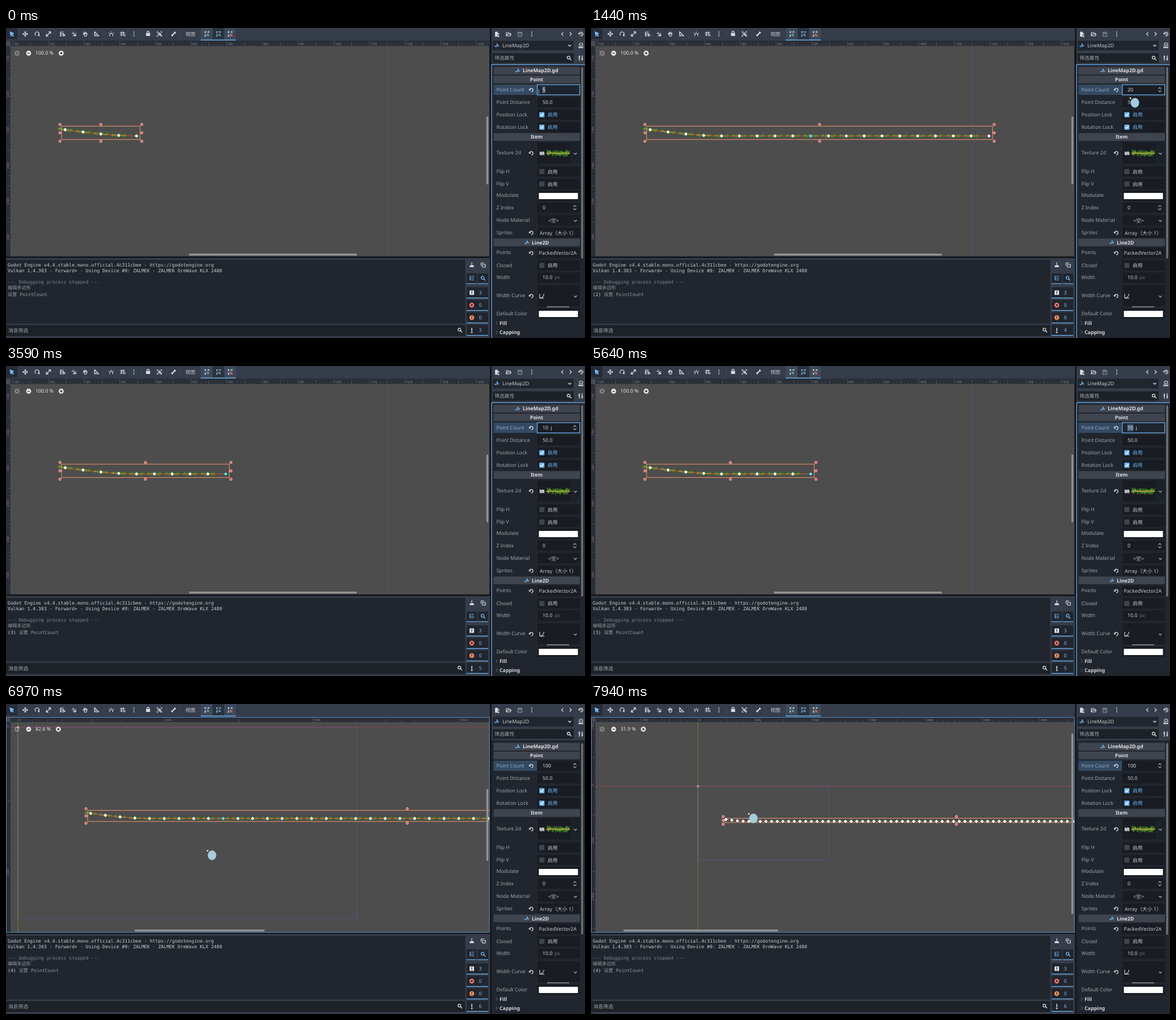
Write an HTML page that moves like this. It is 1023x547 px and loops after 7990 ms.

```html
<!DOCTYPE html>
<html lang="zh">
<head>
<meta charset="utf-8">
<title>Line map editor</title>
<style>
html, body { margin: 0; width: 100%; height: 100%; overflow: hidden; background: #15181d; }
svg { display: block; }
text { font: 8.82px "Noto Sans", "Noto Sans CJK SC", "Noto Sans CJK", sans-serif; white-space: pre; text-rendering: geometricPrecision; text-spacing-trim: space-all; }
.mono { font: 8.18px "DejaVu Sans Mono", "Noto Sans CJK SC", "Noto Sans CJK", monospace; }
.bold { font-weight: 700; }
.tiny { font-size: 5px; }
</style>
</head>
<body>
<svg width="1023" height="547" viewBox="0 0 1023 547">
  <defs>
    <clipPath id="stageClip"><rect x="8" y="32" width="846" height="371"/></clipPath>
    <clipPath id="topClip"><rect x="8" y="23" width="846" height="9"/></clipPath>
    <clipPath id="sideClip"><rect x="0" y="32" width="8" height="371"/></clipPath>
    <g id="grass"></g>
  </defs>
  <g id="view"></g>
  <g id="panels"></g>
  <g id="live"></g>
</svg>
<script>
const LOOP = 7990, UNIT = 0.63;
const BLUE = '#70bafa', TEXT = '#c9ccd0', DIM = '#7f838a', ICON = '#dcdddf', ORANGE = '#f0996a';
const BASE = '#363d4a', PANEL = '#21262e', DARK = '#191d23', GAP = '#15181d';
const $ = id => document.getElementById(id);

// ---- drawing helpers ----
const box = (x, y, w, h, fill, extra = '') => `<rect x="${x}" y="${y}" width="${w}" height="${h}" fill="${fill}" ${extra}/>`;
const frame = (x, y, w, h, color, sw = 1) => box(x, y, w, h, 'none', `stroke="${color}" stroke-width="${sw}"`);
const label = (x, y, s, color = TEXT, cls = '', extra = '') =>
  `<text x="${x}" y="${y + 3.1}" fill="${color}" class="${cls}" ${extra}>${s}</text>`;
const path = (d, color, w = 1, fill = 'none', extra = '') =>
  `<path d="${d}" stroke="${color}" stroke-width="${w}" fill="${fill}" ${extra}/>`;
const icon = (x, y, d, color = ICON, w = 1.2, fill = 'none') =>
  path(d, color, w, fill, `transform="translate(${x} ${y})" stroke-linejoin="round"`);
const dot = (x, y, r, fill, extra = '') => `<circle cx="${x}" cy="${y}" r="${r}" fill="${fill}" ${extra}/>`;

const GLYPH = {
  arrow: 'M-3-4L4-1L1 .5L3.5 3.5L2.5 4.5L0 1.5L-1.5 4Z',
  move: 'M0-3.5V3.5M-3.5 0H3.5M-1.5-2.5L0-4.2L1.5-2.5M-1.5 2.5L0 4.2L1.5 2.5M-2.5-1.5L-4.2 0L-2.5 1.5M2.5-1.5L4.2 0L2.5 1.5',
  rotate: 'M-2.5 2.8A3.7 3.7 0 1 1 2.2 3M2.2 0V3.2H4.5',
  scale: 'M-3 3L3-3M0-3.8H3.8V0M-3.8 0V3.8H0',
  list: 'M-4-3.5H2M-4-1H2M-4 1.5H0M-4-3.5V3.5H-1M1 0L4.5 2L1.5 4Z',
  pivot: 'M-1-4V-1M-4-1H-1M2-1H4M-1 2V4M0 0L4 2L1.5 4Z',
  hand: 'M-2.5 1L-3.8-1M-2.3 1V-3M-.6 0V-4M1.1 0V-3.6M2.8 1V-2.5M-2.5 0H2.8V2L1.5 4H-1Z',
  ruler: 'M-3.5-4V3.5H4Z M-1.5 1V2H0',
  snap: 'M-2.6 3.8V1.5A2.6 2.6 0 0 1 2.6 1.5V3.8M-4-2.5V-1.3M0-4.3V-3.1M4-2.5V-1.3',
  grid: 'M-2-4.5V4M1.5-4.5V1M-4.5-2H4.5M-4.5 1.5H1M2 4V2.5A1.2 1.2 0 0 1 4.5 2.5V4',
  dots: 'M0-4V-2.6M0-.7V.7M0 2.6V4',
  lock: 'M-2-1V-2A2 2 0 0 1 2-2V-1',
  group: 'M-4-2V-4H-2M2-4H4V-2M4 2V4H2M-2 4H-4V2M-2-2H1V1H-2ZM0 0H2.5V2.5H0Z',
  bone: 'M-2.5 2.5L2.5-2.5M-4 1.5L-2.5 2.5L-1.5 4M1.5-4L2.5-2.5L4-1.5',
  file: 'M-3.5-4H.5V-1.5H3V0H0V4H-3.5Z',
  folder: 'M-4 3V-3H-1L0-2H3V0M-4 3L-2 0H4.5L3 3Z',
  save: 'M-3.5-3.5H2.5L3.5-2.5V3.5H-3.5ZM-1.5-3V-1H1.5V-3',
  left: 'M1.5-3L-1.5 0L1.5 3', right: 'M-1.5-3L1.5 0L-1.5 3', down: 'M-2.6-1.2L0 1.4L2.6-1.2',
  history: 'M-3.2-.5A3.3 3.3 0 1 1-1.5 3M-4.5-1.5L-3.2.5L-1.5-1M.3-1.8V.5H2',
  lens: 'M1.2 1.2L4 4M-3.4-.8A2.5 2.5 0 1 1 1.6-.8A2.5 2.5 0 1 1-3.4-.8Z',
  reset: 'M-2.6-.8A2.9 2.9 0 1 1 0 3M-4.2-1.5L-2.6.8L-.8-1',
  wave: 'M-4 1.5C-1-1-2.5 5-.5 1S0-5 1.2-2S1 3.5 4-.5',
  sliders: 'M-2.5-4.5V4.5M2.5-4.5V4.5M-4-1.5H-1M1 1.5H4',
  doc: 'M-3-.5V-2A3 2.5 0 0 1 3-2V-.5ZM-4 2H-2V4H-4ZM-1 2H1V4H-1ZM4.3 2H2.3V4H4.3',
  broom: 'M0-4.5V0M-2.5 1H2.5M-3 3.5H3V1.5H-3Z',
  copy: 'M-1-1H4V4H-1ZM-3.5 1.5V-3.5H1.5',
  tree: 'M-4-3.5H-2M-1-3.5H4M-3-3V3H-1M-.5 0H4M-.5 3H4M-3 0H-1',
  spin: 'M-2.6-1.4L0-3.8L2.6-1.4M-2.6 1.4L0 3.8L2.6 1.4',
  curve: 'M-4-4V3.8H4M-4 3.5C1 3.5 3 1 3.5-4',
  map: 'M-3.8-3L-1.8-2V3.4L-3.8 2.4ZM-.9-2L.9-3V2.4L-.9 3.4ZM1.8-3L3.8-2V3.4L1.8 2.4Z'
};
const glyph = (x, y, name, color, w, fill) => icon(x, y, GLYPH[name], color, w, fill);

// ---- grass strip, 44 by 12, centred on the origin ----
let seed = 7;
const rnd = () => (seed = (seed * 16807) % 2147483647) / 2147483647;
function blades(n) {
  let d = '';
  for (let i = 0; i < n; i++) {
    const x = -19 + rnd() * 38, y = (rnd() - .5) * 6;
    d += `M${x.toFixed(1)} ${y.toFixed(1)}l${((rnd() - .5) * 6).toFixed(1)} ${((rnd() - .5) * 8).toFixed(1)}`;
  }
  return d;
}
$('grass').innerHTML = path(blades(90), '#2c5a1c', 1.4) + path(blades(80), '#4f8f28', 1.1) +
  path('M-21 0H21', '#b09a3c', 1.8) + path(blades(30), '#6aa83c', .8);

// ---- fixed interface ----
function toolbar() {
  let s = box(0, 0, 855, 22.5, BASE) + box(0, 0, 20, 20, '#262c36') + glyph(10, 10.5, 'arrow', BLUE, 1, BLUE);
  const tools = [[34, 'move'], [55, 'rotate'], [75, 'scale'], [100, 'list'], [120, 'pivot'], [140, 'hand'], [160, 'ruler'],
    [186, 'snap'], [206, 'grid'], [271, 'group']];
  for (const [x, name] of tools) s += glyph(x, 10.5, name);
  s += glyph(226, 10.5, 'dots', ICON, 1.8) + glyph(251, 10, 'lock', ICON, 1.3) + box(247.5, 9, 7, 5, ICON) + glyph(296, 10.5, 'bone', ICON, 2);
  for (const x of [87.5, 172.5, 238.5, 283.5, 308.5, 340.5]) s += box(x, 4, .7, 13, '#464d59');
  s += label(317, 10.5, '视图');
  s += box(344, 0, 62, 21, '#3c4a5c') + box(365, 0, 20.5, 20.5, '#2a323e') + box(344, 20.6, 62, 1.3, BLUE);
  [[355, '#5fd08a'], [375.5, BLUE], [396, '#f2694d']].forEach(([x, c], i) => {
    s += path(`M${x - 3} 7V14M${x - 3} 7H${x + 3}M${x - 3} 14L${x + 2} 9`, '#9aa0a8', .8);
    for (const [a, b] of [[-3, 7], [3, 7], [-3, 14]]) s += box(x + a - 1.1, b - 1.1, 2.2, 2.2, i == 1 ? BLUE : ICON);
    s += i == 2 ? path(`M${x} 11l4 4m0-4l-4 4`, c, 1.2) : path(`M${x + 2} 10.5v4m-2-2h4`, c, 1.2);
  });
  return s;
}

function output() {
  let s = box(0, 403, 857, 3, GAP) + box(0, 406, 855, 141, BASE) + box(0, 409, 811.5, 112.5, PANEL) + box(0, 524, 811.5, 19.5, '#1d2229');
  const lines = [[418, 'Godot Engine v4.4.stable.mono.official.4c311cbee - https://godotengine.org', TEXT],
    [428, 'Vulkan 1.4.303 - Forward+ - Using Device #0: ZALMEK - ZALMEK OreWave KLX 2480', TEXT],
    [448, '--- Debugging process stopped ---', DIM], [458.3, '编辑多边形', '#94979d']];
  for (const [y, t, c] of lines) s += label(3, y - .2, t, c, 'mono');
  s += label(4, 533.5, '消息筛选', '#a3a7ac') + glyph(802, 533, 'lens', ICON, 1.3);
  s += glyph(823, 418, 'broom', ICON, 1.2, ICON) + glyph(843, 418, 'copy');
  s += box(814, 433, 18, 18, PANEL) + box(833.5, 433, 18.5, 18, PANEL) + box(814, 450.5, 18, 1.1, BLUE) + box(833.5, 450.5, 18.5, 1.1, BLUE);
  s += glyph(823, 441.5, 'tree', BLUE, 1.2) + glyph(843, 441.5, 'lens', BLUE, 1.3);
  for (const y of [467, 489, 511, 533]) s += box(814, y - 9.5, 38, 19, PANEL) + box(814, y + 8.8, 38, 1.2, BLUE);
  s += box(819, 463, 8, 8, ICON, 'rx="1"') + path('M823 464.3V467.7M823 468.6V469.8', DARK, 1.3);
  s += dot(823, 489, 4.2, '#ff786b') + path('M821.4 487.4l3.2 3.2m0-3.2l-3.2 3.2', DARK, 1.2);
  s += dot(823, 511, 4.2, '#ff8f60') + path('M823 508.3V511.7M823 512.6V513.8', DARK, 1.3);
  s += path('M823 529.3V535M821.8 536.2L823 537.6L824.2 536.2', ICON, 1.6);
  [3, 0, 0].forEach((n, i) => s += label(835.5, 467 + i * 22, n, BLUE));
  return s;
}

function inspector() {
  let s = box(855, 0, 3, 547, GAP) + box(858, 0, 165, 64, BASE) + box(858, 64, 165, 483, PANEL);
  s += glyph(868, 11, 'file', ICON, .8, ICON) + path('M870 12.5v4m-2-2h4', ICON, 1.2);
  s += glyph(888, 11, 'folder', ICON, 1.2) + glyph(908, 11, 'save', '#80858e', 1.3) + glyph(929, 10.5, 'dots', ICON, 1.8);
  s += glyph(983, 10.5, 'left') + glyph(997.5, 10.5, 'right') + glyph(1016, 10.5, 'history');
  s += box(860, 22.5, 143, 17, PANEL) + glyph(867, 31, 'wave', BLUE) + label(877, 30.8, 'LineMap2D') + glyph(996, 31, 'down', ICON, 1.3) + glyph(1016, 31, 'doc', ICON, 1.1);
  s += box(860, 44.5, 143, 17, '#1d2229') + label(863, 53, '筛选属性', '#a3a7ac') + glyph(995, 53, 'lens', ICON, 1.3) + glyph(1015.5, 53, 'sliders', ICON, 1.4);
  for (const y of [68.5, 84, 185.5, 371.5]) s += box(861.5, y, 152.5, 13.5, '#3f444e');
  s += glyph(904, 75.5, 'wave', BLUE) + label(913, 75, 'LineMap2D.gd', '#e0e1e3', 'bold') + label(937.5, 90.5, 'Point', '#e0e1e3', 'bold', 'text-anchor="middle"');
  s += label(937.5, 192, 'Item', '#e0e1e3', 'bold', 'text-anchor="middle"') + glyph(920, 378.5, 'wave', BLUE) + label(929, 378.5, 'Line2D', '#e0e1e3', 'bold');
  s += box(861.5, 100, 76.5, 18, '#344a62');
  const rows = [[108.5, 'Point Count'], [130.5, 'Point Distance'], [152.5, 'Position Lock'], [174.5, 'Rotation Lock'], [220, 'Texture 2d'],
    [252.8, 'Flip H'], [274.8, 'Flip V'], [295.3, 'Modulate'], [316.5, 'Z Index'], [338.8, 'Node Material'], [360.5, 'Sprites'],
    [396.3, 'Points'], [418.5, 'Closed'], [440, 'Width'], [472, 'Width Curve'], [503.5, 'Default Color']];
  rows.forEach(([y, name], i) => {
    const h = i == 4 || i == 14 ? 37 : 18;
    if (i) s += box(939, y + .5 - h / 2, 75, h, DARK);
    s += label(866.5, y, name, i ? '#a0a3a8' : '#93aac4');
    if ([0, 4, 10, 11, 14].includes(i)) s += glyph(928, y + .8, 'reset');
  });
  for (const [y, on] of [[153, 1], [175, 1], [253.2, 0], [275.2, 0], [419, 0]]) {
    s += box(942.3, y - 4.5, 9, 9, on ? BLUE : '#40454d', 'rx="1"');
    if (on) s += path(`M944.3 ${y}l2 2l3.3-4`, '#fff', 1.4);
    s += label(957, y + .3, '启用', on ? BLUE : TEXT);
  }
  s += label(948, 130.5, '50.0') + label(948, 317, '0') + glyph(1005, 317, 'spin', '#b9bcc0', 1.1);
  s += glyph(947, 221, 'map', ICON, .5, ICON) + `<use href="#grass" transform="translate(975.5 221)"/>` + box(997.5, 203, 16.5, 36, '#1d2229');
  for (const y of [221.5, 340, 473.5]) s += glyph(1006, y, 'down', '#b9bcc0', 1.2);
  s += box(941.5, 291, 69, 11, '#fff') + box(941.5, 499, 69, 11, '#fff');
  s += label(967.5, 339.5, '&lt;空&gt;', TEXT, '', 'text-anchor="middle"') + label(975.5, 361.5, 'Array（大小 1）', TEXT, '', 'text-anchor="middle"');
  s += label(941.5, 397, 'PackedVector2A') + label(948, 440, '10.0') + label(969, 440, 'px', '#666b73');
  s += glyph(947, 473, 'curve', ICON, 1.1) + path('M956 492H995', '#cfd1d4', 1);
  s += glyph(867, 520.7, 'right', DIM, .8) + label(872, 520.5, 'Fill', '#d5d7da', 'bold') + glyph(867, 536.7, 'right', DIM, .8) + label(872, 536.5, 'Capping', '#d5d7da', 'bold');
  return s + box(1016.3, 69, 3.4, 338, '#6d7178', 'rx="1.7"');
}

// ---- timeline ----
const CLOCKS = [0, 70, 890, 2530, 3130, 3590, 5050, 5640, 6050, 6870, 7590, 7690];
// time, text, mode: 0 idle, 1 typing, 2 all selected
const FIELD = [[0, '5', 2], [320, '2', 1], [470, '20', 1], [890, '20', 0], [2580, '20', 2], [3130, '1', 1], [3230, '10', 1],
  [3590, '10', 0], [5050, '10', 2], [5740, '1', 1], [5840, '10', 1], [6050, '100', 1], [6100, '100', 0]];
// time, zoom, origin x y, horizontal bar, vertical bar
const VIEWS = [[6770, 1, -51, -4.5, 323, 620, 156, 276], [6970, .826, 21, 41, 227, 457, 150, 277],
  [7590, .467, 149, 124, 143, 383, 116, 294], [7940, .319, 189, 145, 57, 331, 52, 371]];
// time, pointer tip
const MOUSE = [[0, 941, 112], [520, 941, 112], [820, 951, 122], [1640, 951, 122], [2050, 963, 121], [2480, 963, 119.5], [2530, 963, 110],
  [6150, 963, 110], [6650, 354, 257], [7000, 354, 257], [7400, 277, 192]];

const last = (list, t) => list.filter(k => (k[0] ?? k) <= t).pop();
function tick(t) {
  const base = last(CLOCKS, t);
  return base + Math.floor((t - base) / 50) * 50;
}
function span(list, t) {
  let i = 0;
  while (i < list.length - 2 && t >= list[i + 1][0]) i++;
  const a = list[i], b = list[i + 1];
  return [a, b, Math.min(1, Math.max(0, (t - a[0]) / (b[0] - a[0])))];
}
const mix = (a, b, u) => a.map((v, i) => v + (b[i] - v) * u);
function camera(t) {
  const [a, b, u] = span(VIEWS, t);
  const zoom = a[1] * Math.pow(b[1] / a[1], u);
  return mix(a, b, (zoom - a[1]) / (b[1] - a[1]));
}
function pointCount(t) {
  const grow = (from, to, start) => Math.min(to, from + Math.max(0, Math.floor((t - start) * .04)));
  return t < 3590 ? grow(5, 20, 880) : grow(10, 100, 6120);
}

// ---- viewport ----
function rulers(zoom, ox, oy) {
  const s = zoom * UNIT, step = zoom < 1 ? 50 : 10;
  let top = '', side = '', names = '', sideNames = '';
  const start = i => i % 10 == 0 ? 0 : i % 5 == 0 ? .33 : .75;
  for (let i = Math.floor((8 - ox) / s / step) - 10; ; i++) {
    const x = ox + i * step * s;
    if (x > 854) break;
    top += `M${x} ${23 + 9 * start(i)}V32`;
    if (i % 10 == 0) names += label(x + 2, 26.4, i * step, '#8d9198', 'tiny');
  }
  for (let i = Math.floor((32 - oy) / s / step) - 1; ; i++) {
    const y = oy + i * step * s;
    if (y > 425) break;
    side += `M${8 * start(i)} ${y}H8`;
    if (i % 10 == 0) sideNames += `<text class="tiny" fill="#8d9198" transform="translate(5.3 ${y - 1.5}) rotate(-90)">${i * step}</text>`;
  }
  return box(0, 22.5, 855, 9.5, '#2a2f38') + box(0, 32, 8, 371.5, '#2a2f38') +
    `<g clip-path="url(#topClip)">${path(top, '#5e636c', .7)}${names}</g>` +
    `<g clip-path="url(#sideClip)">${path(side, '#5e636c', .7)}${sideNames}</g>` + box(0, 23, 8, 9, '#454a54');
}

function viewport(t) {
  const [, zoom, ox, oy, h0, h1, v0, v1] = camera(t), s = zoom * UNIT, n = pointCount(t);
  const rise = [292, 298.5, 304, 308];
  const pts = Array.from({ length: n }, (_, i) => [ox + s * (247 + 50 * i), oy + s * (rise[i] ?? 309.5)]);
  let g = box(8, 32, 846, 372, '#4d4d4d');
  g += frame(ox, oy, 1152 * s, 648 * s, '#57558c', .8);
  g += path(`M8 ${oy}H854`, 'rgba(245,51,82,.45)', .8) + path(`M${ox} 32V404`, 'rgba(150,214,20,.5)', .8);
  g += path(`M${ox - 2.5} ${oy}h5m-2.5-2.5v5`, '#d8d8d8', .8);

  for (let i = 0; i < n - 1; i++) {
    const [x, y] = pts[i], [x2, y2] = pts[i + 1];
    if (x > 880) break;
    const turn = Math.atan2(y2 - y, x2 - x) * 180 / Math.PI;
    g += `<use href="#grass" transform="translate(${x} ${y}) rotate(${turn}) scale(${zoom * .63})"/>`;
  }
  g += path('M' + pts.map(p => p.join(' ')).join('L'), 'rgba(238,88,44,.8)', 1.1);

  const pad = 10 * s, x0 = pts[0][0] - pad, x1 = pts[n - 1][0] + pad, y0 = pts[0][1] - pad, y1 = oy + 309.5 * s + pad;
  g += frame(x0, y0, x1 - x0, y1 - y0, ORANGE, 1);
  pts.forEach(([x, y], i) => {
    if (x < 870) g += path(`M${x} ${y - 3.8}l3.8 3.8l-3.8 3.8l-3.8-3.8Z`, '#2a2a2a', .9, i == 9 && t < 7690 ? '#5fe3ee' : '#fff');
  });
  for (const x of [x0 - 3, (x0 + x1) / 2, x1 + 3])
    for (const y of [y0 - 3, (y0 + y1) / 2, y1 + 3])
      if (x != (x0 + x1) / 2 || y != (y0 + y1) / 2) g += dot(x, y, 2.2, '#f25f5f', 'stroke="#f3c9c4" stroke-width=".8"');

  g += icon(19.5, 44.5, 'M-4.5 0H-1.5M1.5 0H4.5M0-4.5V-1.5M0 1.5V4.5M-4-4L-1.5-1.5M4-4L1.5-1.5M-4 4L-1.5 1.5M4 4L1.5 1.5', '#e4e4e4', .9);
  const plus = zoom < 1 ? 92.5 : 97.5;
  g += dot(40, 44.5, 4.4, '#f0f0f0') + path('M37.6 44.5H42.4', '#333', 1.3);
  g += dot(plus, 44.5, 4.4, '#f0f0f0') + path(`M${plus - 2.4} 44.5h4.8m-2.4-2.4v4.8`, '#333', 1.3);
  g += label(52, 44.3, (zoom * 100).toFixed(1) + ' %', '#e4e4e4');
  g += box(h0, 398, h1 - h0, 3.4, '#929292', 'rx="1.7"') + box(848.8, v0, 3.4, v1 - v0, '#929292', 'rx="1.7"');
  return `<g clip-path="url(#stageClip)">${g}</g>` + rulers(zoom, ox, oy);
}

// ---- changing parts above the panels ----
function overlay(t) {
  const [, text, mode] = last(FIELD, t);
  const [a, b, u] = span(MOUSE, t), [, mx, my] = mix(a, b, u);
  const inView = t > 6150 && mx < 854;
  let s = box(939, 100, 75, 18, mode ? '#1f252e' : DARK);
  if (mode == 2) s += box(947.5, 103.3, 5.3 * text.length, 11.5, '#4d6781');
  s += label(948, 108.5, text, '#d8dadd');
  if (!mode) s += glyph(1005, 108.8, 'spin', '#b9bcc0', 1.1);
  if (inView) s += frame(.5, 23.5, 853.7, 379.5, '#5a93c6', 1);
  else s += frame(938.7, 100, 75, 18, BLUE, 1.2) + path('M858 547V64.6H1023', '#68acea', 1.3);

  const runs = last([[0, ''], [890, '(2) '], [3590, '(3) '], [6100, '(4) ']], t)[1];
  s += label(3, 469.8, `<tspan fill="${TEXT}">${runs}</tspan>设置 PointCount`, '#94979d', 'mono');
  s += label(835.5, 533, last([[0, 3], [890, 4], [3590, 5], [6100, 6]], t)[1], BLUE);

  if (mx > 939 && my > 100 && my < 118.5) s += path(`M${mx + .5} ${my - 3.5}v7.5`, '#b4c4d0', .9);
  else s += path(`M${mx} ${my}l4.5 1.3l-3 3Z`, '#2f3a40', .4, '#f2f6f8') +
    `<ellipse cx="${mx + 10}" cy="${my + 10}" rx="7.5" ry="8.5" fill="#a3cddd"/>`;
  return s;
}

$('panels').innerHTML = toolbar() + output() + inspector();
let shown = -1;
const begin = performance.now();
function draw() {
  const t = tick((performance.now() - begin) % LOOP);
  if (t != shown) {
    shown = t;
    $('view').innerHTML = viewport(t);
    $('live').innerHTML = overlay(t);
  }
  requestAnimationFrame(draw);
}
draw();
</script>
</body>
</html>
```
